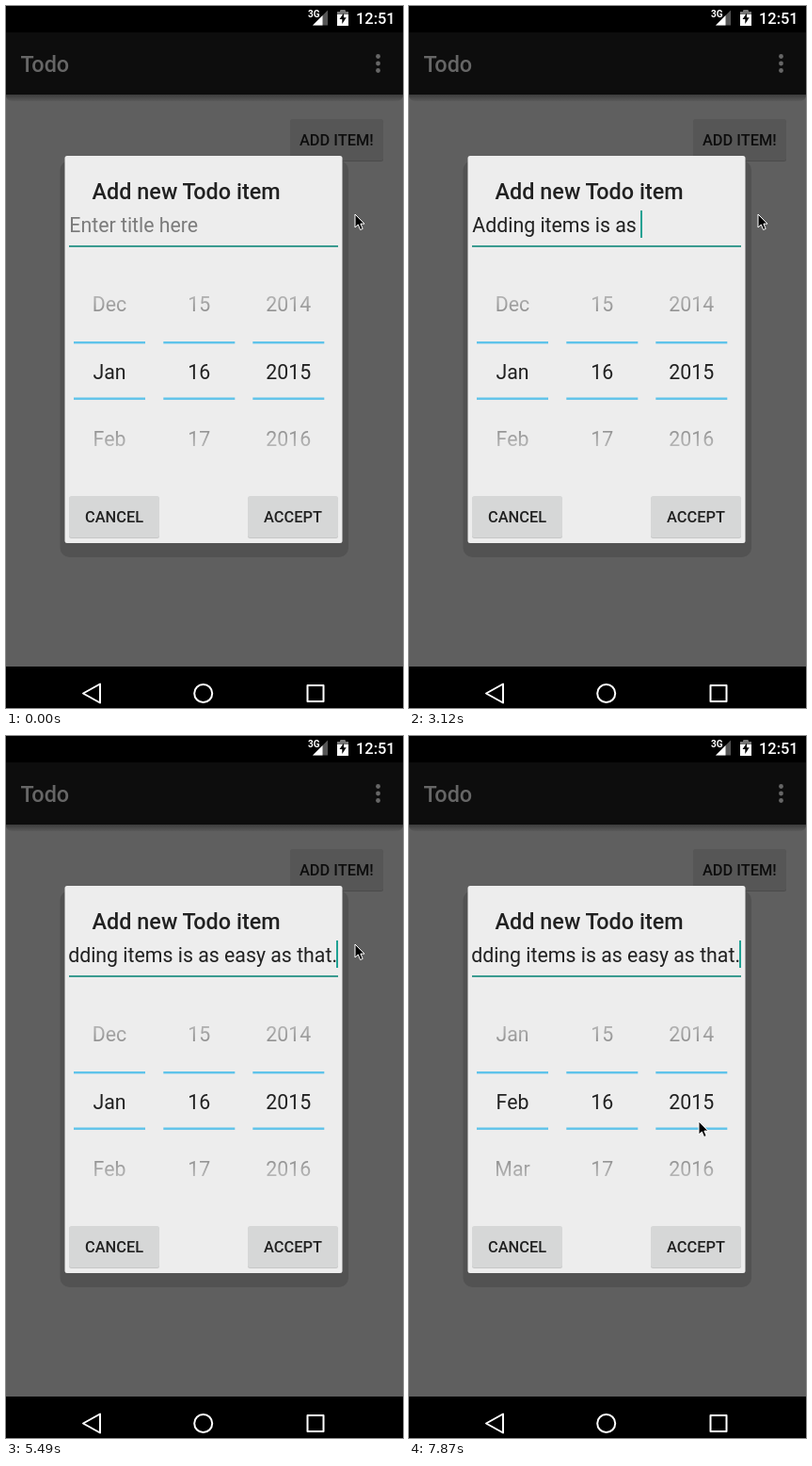
Animation, 422 px wide and 745 px high, one loop 8000 ms. Source, as an HTML page:

```html
<!DOCTYPE html>
<html lang="en">
<head>
<meta charset="utf-8">
<title>Add todo item</title>
<style>
  html, body { margin: 0; width: 100%; height: 100%; overflow: hidden; background: #000; }
  svg { display: block; width: 422px; height: 745px; font-family: Roboto, sans-serif; }
  text { white-space: pre; }
  .title { font-size: 23.4px; font-weight: 500; }
  .button { font-size: 16.4px; font-weight: 500; text-anchor: middle; }
  .input { font-size: 21.3px; }
  .wheel { font-size: 21.3px; text-anchor: middle; }
</style>
</head>
<body>
<svg viewBox="0 0 422 745">
  <defs>
    <linearGradient id="barShadow" x2="0" y2="1">
      <stop stop-color="#3c3c3c"/><stop offset="1" stop-color="#5a5a5a"/>
    </linearGradient>
    <linearGradient id="fade" gradientUnits="userSpaceOnUse" x1="0" x2="0" y1="281" y2="493">
      <stop stop-color="#fff" stop-opacity="0"/>
      <stop offset=".453" stop-color="#fff"/>
      <stop offset=".547" stop-color="#fff"/>
      <stop offset="1" stop-color="#fff" stop-opacity="0"/>
    </linearGradient>
    <mask id="fadeMask" maskUnits="userSpaceOnUse" x="63" y="281" width="294" height="212">
      <rect x="63" y="281" width="294" height="212" fill="url(#fade)"/>
    </mask>
    <clipPath id="fieldClip"><rect x="67" y="212" width="286" height="40"/></clipPath>
  </defs>

  <!-- dimmed app -->
  <rect width="422" height="745" fill="#5f5f5f"/>
  <path d="M0 94H422V96Q421 101 414 101H8Q1 101 0 96Z" fill="url(#barShadow)"/>
  <rect y="28" width="422" height="66" fill="#0d0d0d"/>
  <text class="title" x="15.5" y="70" fill="#666">Todo</text>
  <g fill="#666">
    <circle cx="395.5" cy="53.5" r="2.4"/><circle cx="395.5" cy="61" r="2.4"/><circle cx="395.5" cy="68.5" r="2.4"/>
  </g>
  <rect x="302" y="121" width="99" height="44" rx="2.5" fill="#4b4b4b"/>
  <rect x="302" y="120" width="99" height="44" rx="2.5" fill="#565656"/>
  <text class="button" x="351.3" y="148" fill="#0d0d0d">ADD ITEM!</text>

  <!-- status bar -->
  <rect width="422" height="28"/>
  <text x="321" y="11.5" font-size="10" font-weight="700" fill="#fff">3G</text>
  <path d="M326 20.5L342 4.5V20.5Z" fill="#555"/>
  <path d="M326 20.5L336.5 10V20.5Z" fill="#fff"/>
  <path d="M352 6H355.5V4.5H360.5V6H364V21H352Z" fill="#fff"/>
  <path d="M352 6H355.5V4.5H360.5V6H364V9H352Z" fill="#777"/>
  <path d="M359 7.5L354.5 14H357.3V19L361.7 12.2H359Z"/>
  <text x="372" y="19.3" font-size="16.4" font-weight="500" fill="#fff">12:51</text>

  <!-- navigation bar -->
  <rect y="701" width="422" height="44"/>
  <g fill="none" stroke="#fff" stroke-width="2" stroke-linejoin="round">
    <path d="M82 729.5L100 719.5V739.5Z"/>
    <circle cx="209.7" cy="729.5" r="9.5"/>
    <rect x="320.5" y="721" width="17" height="17"/>
  </g>

  <!-- dialog -->
  <rect x="57.5" y="164" width="306.5" height="421" rx="10" fill="#525252"/>
  <rect x="62.5" y="159" width="295" height="411" rx="2.5" fill="#ededed"/>
  <text class="title" x="91.5" y="205" fill="#212121">Add new Todo item</text>
  <g clip-path="url(#fieldClip)">
    <text class="input" id="field" y="240"></text>
    <rect id="caret" y="217" width="2" height="29" fill="#1fa193"/>
  </g>
  <rect x="67" y="254" width="286" height="2" fill="#3b9b90"/>
  <g id="picker" mask="url(#fadeMask)" fill="#212121"></g>
  <g id="dividers" fill="#5fc3ea"></g>
  <g fill="#c6c7c7">
    <rect x="67" y="521" width="96" height="44" rx="2.5"/><rect x="257" y="521" width="96" height="44" rx="2.5"/>
  </g>
  <g fill="#d6d7d7">
    <rect x="67" y="520" width="96" height="44" rx="2.5"/><rect x="257" y="520" width="96" height="44" rx="2.5"/>
  </g>
  <text class="button" x="115" y="548" fill="#212121">CANCEL</text>
  <text class="button" x="305" y="548" fill="#212121">ACCEPT</text>

  <path id="pointer" d="M0 0V14L3.3 11 5.6 16.5 8.2 15.4 5.9 10.1H10Z" stroke="#fff" stroke-width="1"/>
</svg>
<script>
const LOOP = 8000, LEFT = 67, RIGHT = 353, ROW = 71.5;
const $ = id => document.getElementById(id);
const svg = (parent, tag, attrs, text = '') => {
  const el = document.createElementNS('http://www.w3.org/2000/svg', tag);
  for (const key in attrs) el.setAttribute(key, attrs[key]);
  el.textContent = text;
  return parent.appendChild(el);
};

const typing = [
  [0, ''], [300, 'A'], [450, 'Ad'], [590, 'Add'], [740, 'Addi'], [890, 'Addin'], [1040, 'Adding'],
  [1190, 'Adding i'], [1340, 'Adding ite'], [1480, 'Adding item'], [1780, 'Adding items'],
  [1930, 'Adding items '], [2080, 'Adding items i'], [2230, 'Adding items is'],
  [2370, 'Adding items is '], [2520, 'Adding items is a'], [2670, 'Adding items is as '],
  [2820, 'Adding items is as e'], [3120, 'Adding items is as '], [3270, 'Adding items is as e'],
  [3410, 'Adding items is as ea'], [3560, 'Adding items is as eas'], [3860, 'Adding items is as east'],
  [4010, 'Adding items is as east '], [4450, 'Adding items is as eas'], [4600, 'Adding items is as easy'],
  [4750, 'Adding items is as easy '], [4900, 'Adding items is as easy a'],
  [5050, 'Adding items is as easy as '], [5200, 'Adding items is as easy as t'],
  [5340, 'Adding items is as easy as th'], [5490, 'Adding items is as easy as that.']
];
// time, pointer x, pointer y, month wheel scroll
const moves = [
  [0, 371, 221, 0], [6090, 300, 326, 0], [6240, 180, 360, 0], [6380, 116, 371, 0], [6530, 107, 373, 0],
  [6830, 105, 374, 0], [6980, 105, 371, 0], [7130, 105, 363, 8], [7270, 106, 345, 26],
  [7420, 122, 335, ROW], [7570, 200, 362, ROW], [7720, 282, 398, ROW], [7870, 308, 409, ROW]
];
const blinks = [[0, false], [300, true], [6090, false], [6530, true], [7130, false], [7570, true]];
const at = (track, t) => track.findLast(step => step[0] <= t);

const columns = [
  [110, ['Dec', 'Jan', 'Feb', 'Mar']], [205.3, ['15', '16', '17']], [300.3, ['2014', '2015', '2016']]
];
const wheels = columns.map(([x, labels]) => {
  const wheel = svg($('picker'), 'g', { class: 'wheel' });
  labels.forEach((label, i) => svg(wheel, 'text', { x, y: 324.3 + ROW * i }, label));
  for (const y of [356, 415.5]) svg($('dividers'), 'rect', { x: x - 38, y, width: 76, height: 2.4 });
  return wheel;
});

function render(t) {
  const text = at(typing, t)[1], field = $('field');
  field.textContent = text || 'Enter title here';
  field.setAttribute('fill', text ? '#212121' : '#7b7b7b');
  const width = text ? field.getComputedTextLength() : 0;
  const start = Math.min(LEFT + 0.3, RIGHT - 1 - width);
  field.setAttribute('x', start);
  $('caret').setAttribute('x', Math.min(Math.round(start + width - 0.7), RIGHT - 1));
  $('caret').setAttribute('visibility', at(blinks, t)[1] ? 'visible' : 'hidden');

  const [, x, y, scroll] = at(moves, t);
  $('pointer').setAttribute('transform', `translate(${x} ${y})`);
  wheels[0].setAttribute('transform', `translate(0 ${-scroll})`);
}

const begin = performance.now();
function tick() {
  render((performance.now() - begin) % LOOP);
  requestAnimationFrame(tick);
}
tick();
</script>
</body>
</html>
```
